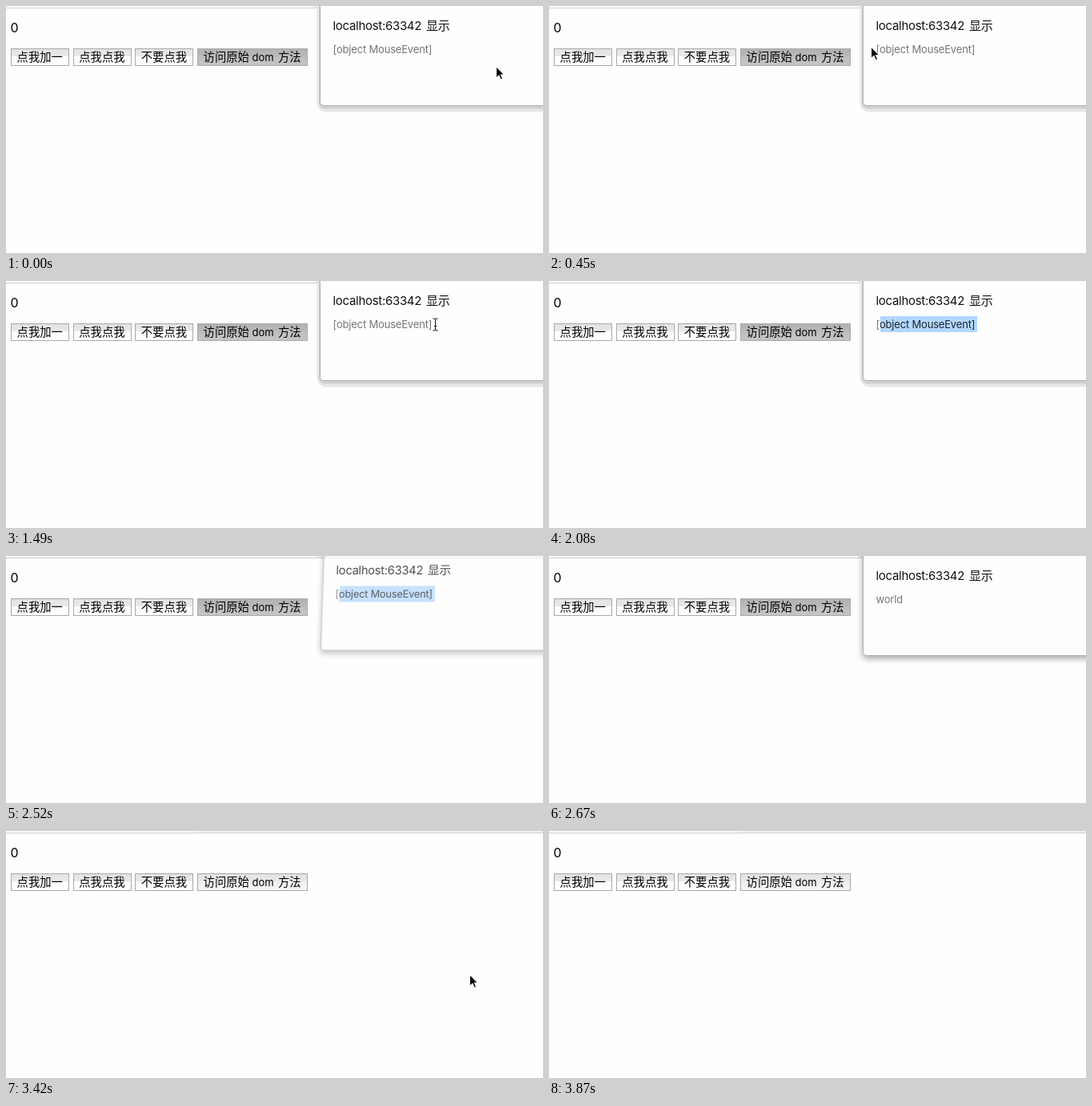
Animation, 671 px wide and 309 px high, one loop 4320 ms. Source, as an HTML page:

```html
<!DOCTYPE html>
<html lang="zh-CN">
<head>
<meta charset="utf-8">
<title>Alert demo</title>
<style>
  html, body { margin: 0; width: 100%; height: 100%; overflow: hidden; background: #fefefe; }
  svg { display: block; width: 671px; height: 309px; }
  text { font-family: Inter, "Noto Sans CJK SC", "Noto Sans CJK", sans-serif; white-space: pre; }
  .label { font-size: 14.3px; }
  .latin { font-size: 13px; }
  .title { font-size: 15px; letter-spacing: -.3px; fill: #111; }
  .body { font-size: 13px; letter-spacing: -.18px; fill: #747474; }
  .dark { fill: #1c2430; }
  .soft { filter: drop-shadow(0 3px 4px rgba(0, 0, 0, .36)); }
</style>
</head>
<body>
<svg viewBox="0 0 671 309">
  <defs>
    <linearGradient id="plain" x2="0" y2="1">
      <stop stop-color="#e3e3e3"/><stop offset=".45" stop-color="#e9e9e9"/>
      <stop offset=".45" stop-color="#fefefe"/><stop offset="1" stop-color="#fefefe"/>
    </linearGradient>
    <linearGradient id="hover" x2="0" y2="1">
      <stop stop-color="#e3e3e3"/><stop offset=".45" stop-color="#e8e8e8"/>
      <stop offset=".45" stop-color="#f1f1f1"/><stop offset="1" stop-color="#f4f4f4"/>
    </linearGradient>
    <linearGradient id="pressed" x2="0" y2="1">
      <stop stop-color="#b2b2b2"/><stop offset=".45" stop-color="#b8b8b8"/>
      <stop offset=".45" stop-color="#bebebe"/><stop offset="1" stop-color="#c6c6c6"/>
    </linearGradient>
    <clipPath id="range"><rect class="sel" y="44" height="20"/></clipPath>
  </defs>

  <rect width="671" height="309" fill="#fefefe"/>
  <rect id="strip" width="671" height="2" fill="#f0f0f0"/>
  <rect y="2" width="671" height="1" fill="#cfcfcf"/>
  <text x="5.5" y="33" font-size="16">0</text>

  <g id="buttons" stroke="#a9a9a9"></g>
  <text class="label" x="13.6" y="69">点我加一</text>
  <text class="label" x="91.3" y="69">点我点我</text>
  <text class="label" x="168.8" y="69">不要点我</text>
  <text class="label" x="246.6" y="69">访问原始</text>
  <text class="latin" x="307.5" y="69">dom</text>
  <text class="label" x="340" y="69">方法</text>

  <g id="dialog">
    <g id="bands">
      <rect x="388.5" y="-20" width="320" height="152.5" rx="12" fill="#e6e6e6"/>
      <rect x="391" y="-20" width="320" height="148.5" rx="7" fill="#d0d0d0"/>
    </g>
    <rect id="panel" x="392.5" y="-20" width="320" height="144.5" rx="4" fill="#fefefe" stroke="#b0b0b0"/>
    <text class="title" x="408.5" y="30">localhost:63342</text>
    <text class="title" x="525" y="30">显示</text>
    <text class="body message" x="408.5" y="59"></text>
    <g id="selection">
      <rect class="sel" y="44" height="20" fill="#b3d7ff"/>
      <text class="body dark message" x="408.5" y="59" clip-path="url(#range)"></text>
    </g>
  </g>

  <path id="arrow" d="M1.5 1.5V16.2L4.9 13L7.3 18.3L9.7 17.2L7.4 12.1H11.8Z"
        fill="#000" stroke="#fff" stroke-width="1.1"/>
  <g id="beam" fill="none" stroke-linecap="round">
    <path d="M.8 1H2Q3.5 1 3.5 2.5Q3.5 1 5 1H6.2M3.5 2.5V14.5M.8 16H2Q3.5 16 3.5 14.5Q3.5 16 5 16H6.2M2.3 10.5H4.7"
          stroke="#fff" stroke-width="2.2" stroke-opacity=".7"/>
    <path d="M.8 1H2Q3.5 1 3.5 2.5Q3.5 1 5 1H6.2M3.5 2.5V14.5M.8 16H2Q3.5 16 3.5 14.5Q3.5 16 5 16H6.2M2.3 10.5H4.7"
          stroke="#111"/>
  </g>
</svg>
<script>
  const LOOP = 4320;
  const $ = id => document.getElementById(id);
  const all = sel => document.querySelectorAll(sel);
  const show = (el, on) => { el.style.display = on ? '' : 'none'; };

  // Pointer moves in hard steps: start time, shape, left, top
  const pointer = [
    [0, 'arrow', 611, 74], [150, 'beam', 467, 52], [300, 'beam', 462, 51],
    [450, 'arrow', 401, 49.5], [600, 'arrow', 391, 51], [740, 'beam', 407, 47],
    [890, 'beam', 436, 47], [1040, 'beam', 490, 47], [1190, 'beam', 514, 47.5],
    [1340, 'beam', 525, 47], [1490, 'beam', 533, 46], [1630, 'beam', 433, 47],
    [1780, 'beam', 424, 49], [1930, 'arrow', 657, 73], [2080, ''],
    [3420, 'arrow', 578, 178], [3570, 'arrow', 575, 229], [3720, 'arrow', 601, 285],
    [3870, '']
  ];

  const CLOSING = 'matrix(.983 0 -.034 1 11.8 -6.5)';

  const buttons = [[6, 73], [84, 73], [161, 73], [239, 138]].map(([x, w]) => {
    const rect = document.createElementNS('http://www.w3.org/2000/svg', 'rect');
    const attrs = { x: x + .5, y: 53.5, width: w - 1, height: 21, fill: 'url(#plain)' };
    for (const k in attrs) rect.setAttribute(k, attrs[k]);
    return $('buttons').appendChild(rect);
  });

  function drawPointer(t) {
    const [, shape, x, y] = pointer.filter(p => p[0] <= t).pop();
    for (const id of ['arrow', 'beam']) show($(id), id === shape);
    if (shape) $(shape).setAttribute('transform', `translate(${x} ${y})`);
  }

  function drawDialog(t) {
    const closing = (t >= 2520 && t < 2670) || t >= 3270;
    const dialog = $('dialog');
    show(dialog, t < 3420);
    dialog.setAttribute('transform', closing ? CLOSING : '');
    dialog.setAttribute('opacity', closing ? .72 : 1);
    show($('bands'), t < 2520);
    $('panel').setAttribute('class', t < 2520 ? '' : 'soft');

    const message = t < 2670 ? '[object MouseEvent]' : 'world';
    all('.message').forEach(el => { el.textContent = message; });

    show($('selection'), t >= 1630 && t < 2670);
    const left = t < 1780 ? 420 : 414;
    all('.sel').forEach(el => {
      el.setAttribute('x', left);
      el.setAttribute('width', 535 - left);
    });
  }

  function draw(t) {
    const released = t >= 3270;
    buttons[3].setAttribute('fill', released ? 'url(#hover)' : 'url(#pressed)');
    $('strip').setAttribute('x', released ? 240 : 386);
    drawDialog(t);
    drawPointer(t);
  }

  const start = performance.now();
  function tick() {
    draw((performance.now() - start) % LOOP);
    requestAnimationFrame(tick);
  }
  tick();
</script>
</body>
</html>
```
